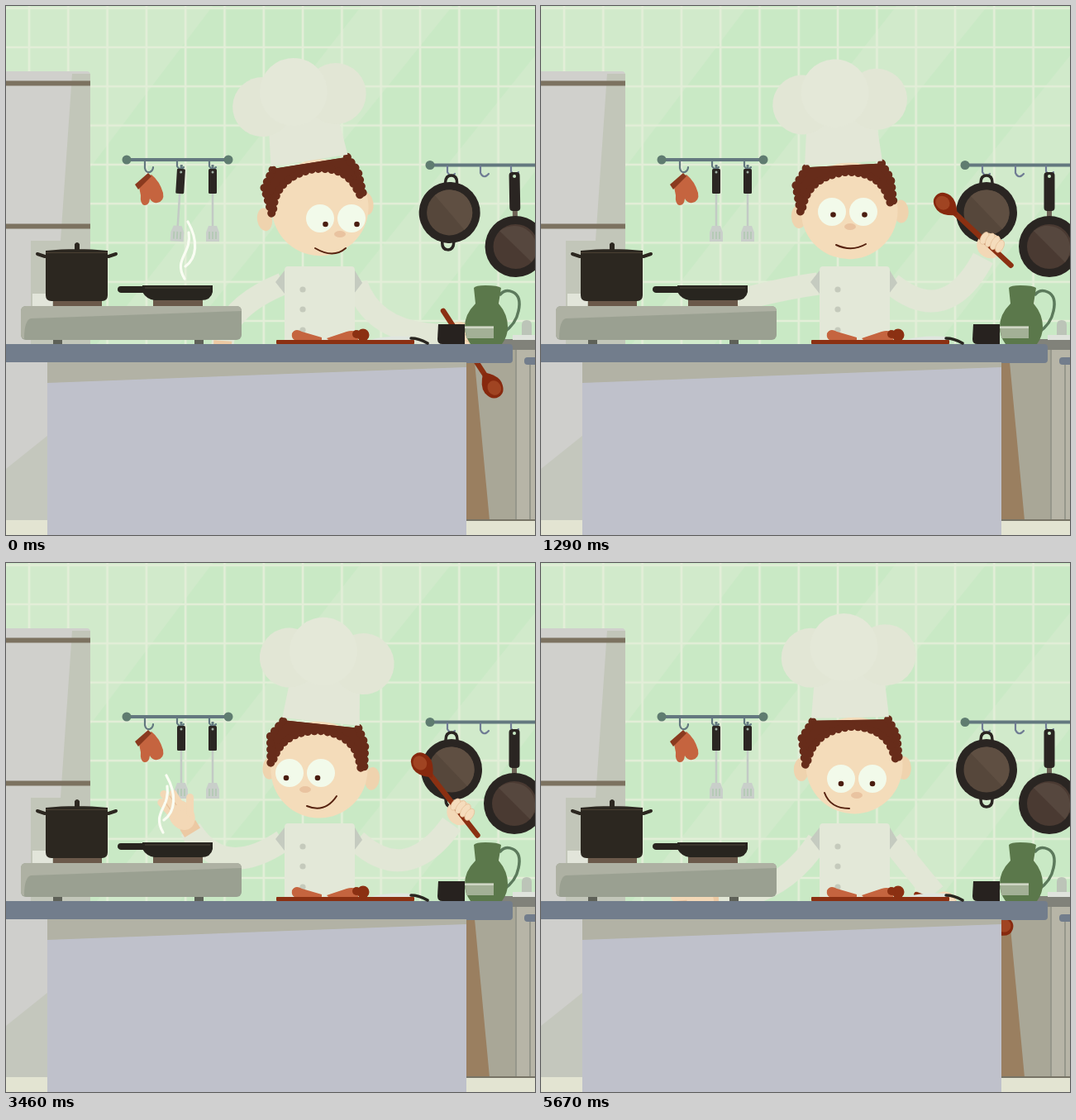
Write an HTML page that moves like this. It is 640 by 640 pixels and loops after 5.75 s.

```html
<!DOCTYPE html>
<html lang="en">
<head>
<meta charset="utf-8">
<title>Cook in the kitchen</title>
<style>
html, body { margin: 0; height: 100%; overflow: hidden; background: #cce9c8 }
svg { display: block; width: 100vw; height: 100vh }
.line { fill: none; stroke-linecap: round }
</style>
</head>
<body>
<svg viewBox="0 0 640 640" xmlns="http://www.w3.org/2000/svg">
<defs>
  <pattern id="tiles" x="4.3" y="26.3" width="47.3" height="47.3" patternUnits="userSpaceOnUse">
    <path d="M23.7 0V47.3M0 23.7H47.3" stroke="#e3eed8" stroke-width="2.6"/>
  </pattern>
  <clipPath id="lids"><rect id="lid" x="-60" width="120"/></clipPath>
  <g id="spatula">
    <path d="M0 -5V0" stroke="#63787f" stroke-width="3"/>
    <path d="M0 30V72" stroke="#c3cac5" stroke-width="2.5"/>
    <rect x="-5" width="10" height="30" rx="1.5" fill="#2b2623"/>
    <circle cy="4" r="1.5" fill="#9fb0a4"/>
    <path d="M-5 69H5L8 77V88H-8V77Z" fill="#c9cfca"/>
    <path d="M-4 76V85M0 76V85M4 76V85" stroke="#b3c9b4" stroke-width="1.8"/>
  </g>
</defs>

<!-- wall -->
<rect width="640" height="640" fill="#c9e9c5"/>
<path d="M0 0H250L0 330ZM430 0H540L210 409H110ZM640 60V200L480 409H360Z" fill="#d1eacb"/>
<rect width="640" height="409" fill="url(#tiles)"/>

<!-- fridge and floor -->
<rect y="622" width="640" height="18" fill="#e3e4d2"/>
<path d="M0 79H98Q102 79 102 84V622H0Z" fill="#d0d0cc"/>
<path d="M80 82H102V409H30V284H66ZM0 560L50 520V622H0Z" fill="#c2c6b9"/>
<path d="M0 93.5H102M0 266.5H102" stroke="#7c7260" stroke-width="6"/>
<rect x="32" y="348" width="24" height="15" fill="#e2e5da"/>

<!-- left rail -->
<path d="M146 186H269" stroke="#63787f" stroke-width="4"/>
<circle cx="146" cy="186" r="5.5" fill="#5f7c70"/><circle cx="269" cy="186" r="5.5" fill="#5f7c70"/>
<path class="line" d="M168 188V196Q169 202 174 201Q178 199 178 195M207 188V194Q211 200 215 195M246 188V194Q250 200 254 195" stroke="#63787f" stroke-width="2.2"/>
<path d="M160 214L176 204Q186 212 190 226Q192 236 183 238Q177 239 174 233Q173 242 167 241Q162 239 163 229Z" fill="#c5643f"/>
<path d="M156 216L172 202L176 206L160 222Z" fill="#8a3a1f"/>
<g id="tool1"><use href="#spatula"/></g>
<g id="tool2"><use href="#spatula"/></g>

<!-- right rail -->
<path d="M513 192.5H640" stroke="#63787f" stroke-width="4"/>
<circle cx="513" cy="192.5" r="5.5" fill="#5f7c70"/>
<path class="line" d="M534 194V201Q538 208 543 203M574 194V202Q578 210 584 203M611 194V200Q615 206 620 201" stroke="#707c94" stroke-width="2.2"/>
<g id="wok">
  <path class="line" d="M-7 9Q-7 0 0 0Q7 0 7 9M-7 81Q-7 90 0 90Q7 90 7 81" stroke="#2a2522" stroke-width="3.5"/>
  <circle cy="45" r="37" fill="#2a2522"/><circle cy="45" r="27.5" fill="#56473b"/>
  <path d="M-19 25A27.5 27.5 0 0 1 19 65Z" fill="#5f4f42"/>
</g>
<g id="skillet">
  <rect x="-3" y="42" width="6" height="15" fill="#6d6256"/>
  <rect x="-6.5" width="13" height="47" rx="4" fill="#2a2522"/>
  <circle cy="5" r="2" fill="#c9e9c5"/>
  <circle cy="90" r="37" fill="#2a2522"/><circle cy="90" r="27" fill="#4a3a32"/>
  <path d="M-19 71A27 27 0 0 1 19 109Z" fill="#56473e"/>
</g>

<!-- back cupboard -->
<rect x="557" y="416" width="83" height="206" fill="#a9a797"/>
<path d="M557 431H567L585 622H557Z" fill="#9a7f60"/>
<rect x="616" y="416" width="24" height="206" fill="#b7b5a7"/>
<path d="M617 416V622M634 434V622" stroke="#96978b" stroke-width="2"/>
<path d="M557 622H640" stroke="#777466" stroke-width="2"/>
<rect x="627" y="425" width="20" height="9" rx="4" fill="#727d8c"/>
<rect x="600" y="403" width="40" height="13" fill="#81827a"/>
<rect x="613" y="398" width="27" height="6" fill="#dfe3dc"/>
<path d="M624 398V386Q624 380 630 380Q636 380 636 386V398Z" fill="#bcc4b8"/>

<!-- cook -->
<path id="armL" class="line" style="stroke-linecap:butt" stroke="#e2e7d6" stroke-width="27"/>
<path id="armR" class="line" style="stroke-linecap:butt" stroke="#e2e7d6" stroke-width="27"/>
<g id="handL" fill="#f3d8b6">
  <path d="M-5 -11H6V11H-5Z" fill="#ecc9a3"/>
  <ellipse cx="20" cy="0" rx="19" ry="15"/>
  <g stroke="#f3d8b6" stroke-width="9" stroke-linecap="round">
    <path d="M24 -9L46 -13M28 -3L53 -5M28 5L48 5M17 10L33 20"/>
  </g>
  <path class="line" d="M33 -8L45 -9M34 1L47 0" stroke="#e6c29c" stroke-width="1.3"/>
</g>
<g id="fist"><ellipse rx="16" ry="15" fill="#f3d8b6"/></g>
<g id="spoon">
  <rect x="-38" y="-3.2" width="106" height="6.4" rx="3" fill="#8b3012"/>
  <path d="M54 0Q66 -13 76 -12Q89 -10 89 0Q89 10 76 12Q66 13 54 0" fill="#87290e"/>
  <ellipse cx="77" cy="-1" rx="9" ry="8" fill="#a04422"/>
</g>
<g id="knuckles" fill="#f5dcbc" stroke="#e6c29c" stroke-width=".8">
  <ellipse cx="-10" cy="-5" rx="4.5" ry="8"/><ellipse cx="-3" cy="-6" rx="4.5" ry="9"/>
  <ellipse cx="4" cy="-6" rx="4.5" ry="9"/><ellipse cx="11" cy="-5" rx="4.5" ry="8"/>
</g>
<path d="M337 320L326 334L337 348ZM422 320L431 335L421 348Z" fill="#c5cbc0"/>
<path d="M341 315H418Q422 315 422 320V409H337V320Q337 315 341 315Z" fill="#e3e8d8"/>
<g fill="#c5cabc"><circle cx="359" cy="343" r="3.6"/><circle cx="359" cy="367" r="3.6"/><circle cx="359" cy="392" r="3.6"/></g>
<g id="head">
  <g id="ears" fill="#efd3ae"><ellipse cx="-59" cy="62" rx="9" ry="14"/><ellipse cx="65" cy="62" rx="9" ry="14"/></g>
  <circle cx="4" cy="58" r="58.5" fill="#f4dcba"/>
  <g fill="#672c1a" stroke="#672c1a">
    <path id="hair" d="M-45 3H46L56 22L58 52L53 50Q46 13 3 11Q-43 14 -52 50L-57 54L-59 24Z" stroke="none"/>
    <use href="#hair"/>
    <path d="M46 3L56 22L58 52L53 50Q46 13 3 11Q-43 14 -52 50L-55 57L-59 24L-45 3" fill="none" stroke-width="10" stroke-linecap="round" stroke-dasharray="0 8"/>
  </g>
  <path d="M-47 0L-40 -70H40L47 0Z" fill="#e3e7d7"/>
  <circle cx="-46" cy="-73" r="36" fill="#e2e6d5"/><circle cx="44" cy="-75" r="37" fill="#e2e6d5"/>
  <circle cx="-6" cy="-85" r="41" fill="#e4e8d8"/>
</g>
<ellipse id="nose" rx="7" ry="4" fill="#e9c3a0"/>
<g id="eyes"><g clip-path="url(#lids)">
  <g fill="#f2faea"><circle cx="-19" r="17"/><circle cx="19" r="17"/></g>
  <g id="pupils" fill="#4a1d10"><circle cx="-19" r="3.3"/><circle cx="19" r="3.3"/></g>
</g></g>
<path id="mouth" class="line" stroke="#56220f" stroke-width="2"/>

<!-- counter -->
<path d="M0 431H50V622H0Z" fill="#c4c7bd"/>
<path d="M0 431H50V520L0 560Z" fill="#cfcfcc"/>
<rect x="50" y="431" width="507" height="209" fill="#bfc1cb"/>
<path d="M50 431H557V437L50 456Z" fill="#b2b2a5"/>
<path d="M0 409H609Q613 409 613 413V428Q613 432 609 432H557V431H0Z" fill="#727d8c"/>

<!-- stove -->
<path d="M57 403H68V409H57ZM228 403H239V409H228Z" fill="#5e6158"/>
<rect x="18" y="363" width="267" height="41" rx="6" fill="#9aa091"/>
<path d="M24 363H279Q285 363 285 369L30 378Q22 380 22 403Q18 401 18 398V369Q18 363 24 363Z" fill="#aeb1a3"/>
<path d="M57 355H116V363H57ZM178 355H238V363H178Z" fill="#6b594a"/>
<path d="M48 298H123V350Q123 357 116 357H55Q48 357 48 350ZM48 296Q85 292 123 296V300H48ZM83 288Q86 284 89 288V296H83Z" fill="#2c2720"/>
<path class="line" d="M38 300L47 303M133 300L124 303" stroke="#2c2720" stroke-width="4"/>
<path d="M48 298.5H123" stroke="#4a4033" stroke-width="1.2"/>
<path d="M165 338H250V346Q248 356 236 356H180Q170 355 165 346ZM139 339H168V347H139Q135 346 135 343Q135 339 139 339Z" fill="#28251f"/>
<path d="M168 341H247" stroke="#3f3a30" stroke-width="1.5"/>
<g id="steam" class="line" stroke="#fafdf3" stroke-width="3.2">
  <path pathLength="1" d="M-6 0C-20 -24 3 -30 -1 -56"/>
  <path pathLength="1" d="M-5 -15C9 -25 11 -46 -2 -69"/>
</g>

<!-- on the counter -->
<rect x="327" y="404" width="167" height="5" rx="1" fill="#8b3012"/>
<path d="M346 396Q350 389 358 394L382 401V404H349Q345 402 346 396ZM388 402L412 394Q422 391 426 397V404H390Z" fill="#c5643f"/>
<circle cx="432" cy="398" r="7.5" fill="#8b3012"/><circle cx="424" cy="397" r="5" fill="#8b3012"/>
<path d="M441 404Q460 398 491 400V404Z" fill="#dfe5de"/>
<path class="line" d="M490 402Q500 402 510 408" stroke="#28251f" stroke-width="3.5"/>
<path class="line" d="M598 349Q604 342 613 346Q624 351 620 369Q617 385 602 395" stroke="#5c7a5c" stroke-width="3.5"/>
<path d="M566 341Q568 338 580 338Q595 338 599 341L596 360Q607 373 607 388Q607 400 600 409H562Q555 400 555 388Q555 373 568 360Z" fill="#5b784b"/>
<path d="M555 387H590V402H557Z" fill="#a3b096"/><path d="M555 389H590" stroke="#cfd6c4" stroke-width="2"/>
<path d="M523 385H555V409H528Q522 409 522 403Z" fill="#27221f"/>
</svg>

<script>
const LOOP = 5750, LAST = 5670;
const $ = id => document.getElementById(id);
const set = (id, name, value) => $(id).setAttribute(name, value);
const move = (id, x, y, turn = 0) => set(id, 'transform', `translate(${x} ${y}) rotate(${turn})`);

// head: x, y, tilt, eyes x/y, pupil offset x/y, nose x/y
// mouth: start, control, end
const faces = {
  right: [367, 187, -9, 399, 257, 6.5, 7, 404, 276, 374, 293, 396, 306, 411, 293],
  front: [376, 190, 0, 377, 248, 0, 3.5, 378, 266, 360, 287, 378, 298, 397, 287],
  tilt: [366, 190, -3, 371, 249, 1.5, 3.5, 374, 267, 357, 289, 376, 298, 393, 288],
  left: [381, 192, 6, 362, 254, -4, 6, 362, 274, 364, 294, 386, 303, 400, 282],
  down: [374, 187, -1, 382, 261, 0, 6, 382, 281, 343, 278, 350, 297, 373, 297]
};
const headKeys = [
  [0, 'right'], [120, 'right'], [560, 'front'], [1000, 'front'], [1270, 'tilt'], [1380, 'tilt'],
  [1740, 'front'], [2450, 'front'], [2800, 'left'], [4750, 'left'], [5250, 'down'], [LAST, 'down']
].map(([t, name]) => [t, ...faces[name]]);

// elbow x/y, hand x/y, spoon angle
const rightKeys = [
  [0, 445, 398, 548, 398, 57], [560, 515, 360, 520, 245, -173], [1000, 515, 360, 520, 245, -173],
  [1290, 490, 390, 543, 290, -137], [1650, 485, 392, 547, 298, -131], [2300, 485, 392, 547, 298, -131],
  [2800, 485, 392, 549, 302, -128], [3850, 485, 392, 549, 302, -128], [4340, 458, 400, 557, 365, -104],
  [5200, 455, 380, 470, 425, -5], [LAST, 455, 375, 487, 413, 20]
];
// elbow x/y, wrist x/y
const raised = [270, 385, 222, 328], bent = [262, 385, 223, 322];
const leftKeys = [
  [0, 265, 365, 262, 410], [1000, 265, 365, 262, 410], [1290, 290, 342, 232, 358],
  [1650, ...raised], [2350, ...raised], [2650, ...bent], [2950, ...raised], [3300, ...bent],
  [3750, ...bent], [4250, 290, 405, 210, 408], [LAST, 290, 405, 210, 408]
];
// spatulas, wok, skillet
const swingKeys = [
  [0, 3.5, 0, 3, -1], [480, 0, 0, -1.5, .5], [790, 0, -5, -1, 0], [1200, 0, 0, 0, 0], [LAST, 0, 0, 0, 0]
];
const puffs = [[-500, 222, 330], [1750, 222, 330], [3000, 196, 326], [4310, 222, 331]];

function sample(keys, t) {
  const i = Math.max(1, keys.findIndex(k => k[0] >= t));
  const a = keys[i - 1], b = keys[i];
  const u = (t - a[0]) / (b[0] - a[0]), e = u * u * (3 - 2 * u);
  return a.slice(1).map((v, j) => v + (b[j + 1] - v) * e);
}

function drawHead(t) {
  const [x, y, tilt, ex, ey, px, py, nx, ny, ...m] = sample(headKeys, t);
  move('head', x, y, tilt);
  move('ears', (377 - ex) / 4, 0);
  move('eyes', ex, ey);
  move('pupils', px, py);
  move('nose', nx, ny);
  set('mouth', 'd', `M${m[0]} ${m[1]}Q${m.slice(2)}`);
  const open = 18 * Math.min(1, Math.abs(t - 2240) / 70);
  set('lid', 'y', -open);
  set('lid', 'height', 2 * open);
}

function drawArms(t) {
  const [cx, cy, hx, hy, angle] = sample(rightKeys, t);
  const dir = Math.atan2(hy - cy, hx - cx);
  set('armR', 'd', `M424 336Q${cx} ${cy} ${hx - 17 * Math.cos(dir)} ${hy - 17 * Math.sin(dir)}`);
  const turn = dir * 180 / Math.PI + 90;
  move('fist', hx, hy, turn);
  move('knuckles', hx, hy, turn);
  move('spoon', hx, hy, angle);

  const [ex, ey, wx, wy] = sample(leftKeys, t);
  set('armL', 'd', `M335 336Q${ex} ${ey} ${wx} ${wy}`);
  move('handL', wx, wy, Math.atan2(wy - ey, wx - ex) * 180 / Math.PI);
}

function drawSteam(t) {
  const puff = puffs.find(([start]) => t > start && t < start + 950);
  $('steam').style.display = puff ? '' : 'none';
  if (!puff) return;
  const age = t - puff[0];
  const from = Math.max(0, (age - 550) / 400), to = Math.min(1, age / 350);
  move('steam', puff[1], puff[2]);
  for (const p of $('steam').children)
    p.setAttribute('stroke-dasharray', `0 ${from} ${to - from} 2`);
}

function frame(now) {
  const t = Math.min(now % LOOP, LAST);
  const [s1, s2, wok, skillet] = sample(swingKeys, t);
  move('tool1', 212, 197, s1);
  move('tool2', 250, 197, s2);
  move('wok', 539, 205, wok);
  move('skillet', 615, 201, skillet);
  drawHead(t);
  drawArms(t);
  drawSteam(t);
  requestAnimationFrame(frame);
}
frame(0);
</script>
</body>
</html>
```
